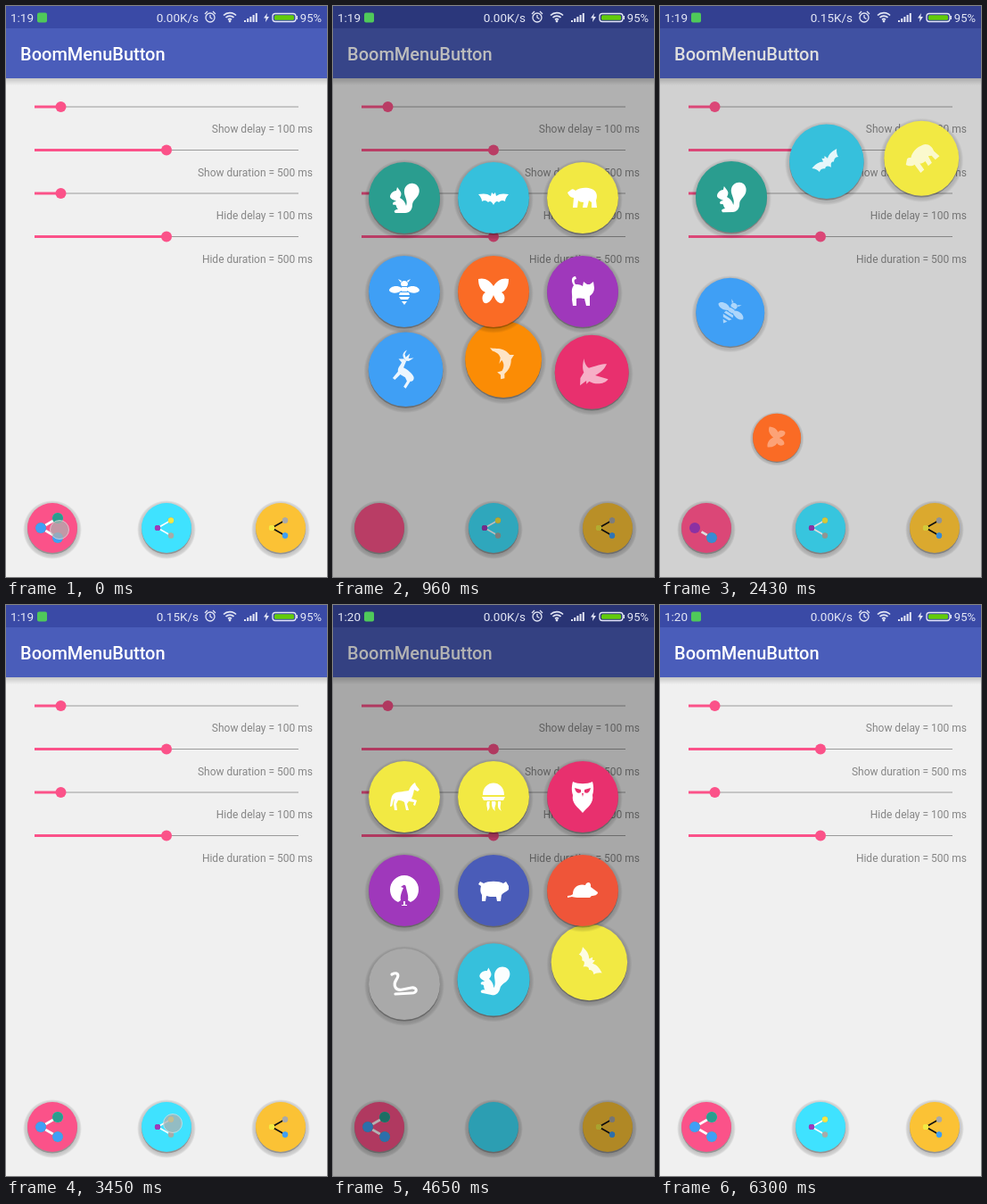
Animation, 360 px wide and 640 px high, one loop 6390 ms. Source, as an HTML page:

```html
<!DOCTYPE html>
<html lang="en">
<head>
<meta charset="utf-8">
<title>BoomMenuButton</title>
<style>
html, body { margin: 0; width: 100%; height: 100%; overflow: hidden; background: #f0f0f0; }
svg { display: block; width: 360px; height: 640px; font-family: Roboto, sans-serif; }
</style>
</head>
<body>
<svg id="stage" viewBox="0 0 360 640" xmlns="http://www.w3.org/2000/svg">
  <defs>
    <radialGradient id="shade">
      <stop offset=".86" stop-color="#000" stop-opacity=".18"/>
      <stop offset=".94" stop-color="#000" stop-opacity=".12"/>
      <stop offset="1" stop-color="#000" stop-opacity="0"/>
    </radialGradient>
    <linearGradient id="drop" x2="0" y2="1">
      <stop stop-color="#000" stop-opacity=".18"/>
      <stop offset="1" stop-color="#000" stop-opacity="0"/>
    </linearGradient>
  </defs>
  <rect width="360" height="640" fill="#f0f0f0"/>
  <rect y="81" width="360" height="8" fill="url(#drop)"/>
  <rect width="360" height="81" fill="#4a5dba"/>
  <rect width="360" height="25" fill="#3a4aa6"/>
  <text x="16" y="61" font-size="20" font-weight="500" fill="#fff">BoomMenuButton</text>
  <g id="sliders"></g>
  <g id="buttons"></g>
  <rect id="dim" width="360" height="640"/>
  <g font-size="13.500" fill="#e4e7f5">
    <text id="clock" x="5" y="18"></text>
    <text id="speed" x="216" y="18" text-anchor="end"></text>
    <text x="354" y="18" text-anchor="end" font-size="13">95%</text>
    <rect x="35" y="7.500" width="11" height="11" rx="2" fill="#4fc95a"/>
    <g fill="none" stroke="#e4e7f5" stroke-width="1.300">
      <circle cx="229" cy="13" r="5"/>
      <path d="M229 10v3l2.500 1.500M223 9l3-3M235 9l-3-3"/>
      <path d="M244 10.500a10 10 0 0 1 14 0M246.500 13a6.500 6.500 0 0 1 9 0M249 15.300a3 3 0 0 1 4 0" stroke-width="1.700"/>
      <rect x="299" y="8.500" width="26" height="9" rx="3"/>
    </g>
    <circle cx="251" cy="17" r="1.400"/>
    <path d="M267 18v-2h2v2zM270.200 18v-4h2v4zM273.400 18v-6h2v6zM276.600 18v-8h2v8zM279.800 18V8h2v10z"/>
    <path d="M293 8l-4 5.500h2.500L291 18l4-6h-2.700z"/>
    <rect x="301" y="10.300" width="22" height="5.400" rx="1.500" fill="#62cc0a"/>
    <rect x="325.500" y="11" width="1.500" height="4"/>
  </g>
  <g id="items"></g>
  <circle id="touch" r="10.500" fill="#b0b0b0" stroke="#ddd" stroke-width="1"/>
</svg>
<script>
const LOOP = 6390, STEP = 30, SPEED = 1.111;
const DELAY = 100, DURATION = 500, TOTAL = 8 * DELAY + DURATION, FADE = 220;
const $ = id => document.getElementById(id);
const clamp = (v, lo = 0, hi = 1) => Math.min(hi, Math.max(lo, v));

function add(parent, tag, attrs) {
  const node = document.createElementNS('http://www.w3.org/2000/svg', tag);
  set(node, attrs);
  return parent.appendChild(node);
}
function set(node, attrs) {
  for (const key in attrs) node.setAttribute(key, attrs[key]);
}

function bezier(x1, y1, x2, y2) {
  const at = (a, b, s) => 3 * (1 - s) ** 2 * s * a + 3 * (1 - s) * s * s * b + s ** 3;
  return t => {
    if (t <= 0 || t >= 1) return clamp(t);
    let lo = 0, hi = 1;
    for (let i = 0; i < 24; i++) {
      const mid = (lo + hi) / 2;
      if (at(x1, x2, mid) < t) lo = mid; else hi = mid;
    }
    return at(y1, y2, lo);
  };
}
const outBack = bezier(.175, .885, .32, 1.275);
const inBack = bezier(.6, -.2, .735, .045);

const icons = {
  squirrel: 'M-16,-1C-16,-5 -12,-8 -9,-8L-8,-12 -5,-8C-3,-6 -3,-3 -5,0C-1,2 1,5 2,9C4,4 1,0 0,-5C-1,-13 5,-17 10,-16C16,-15 18,-9 16,-4C14,1 9,3 9,8C9,13 6,17 1,17L-10,17C-13,15 -10,13 -7,13C-10,10 -8,7 -12,8C-14,7 -13,4 -9,4C-12,2 -15,2 -16,-1Z',
  bat: 'M-17,-4C-11,-5 -7,-5 -3,-2L-2,-6 0,-4 2,-6 3,-2C7,-5 11,-5 17,-4C14,-1 13,2 13,4C10,2 8,3 6,5C4,3 2,4 0,8C-2,4 -4,3 -6,5C-8,3 -10,2 -13,4C-13,2 -14,-1 -17,-4Z',
  bear: 'M-17,-6L-13,-9C-11,-11 -9,-9 -8,-8C-3,-12 5,-12 10,-10C16,-8 17,-2 15,3L16,11 10,11 10,5 7,3 5,11 0,11 1,5C-2,5 -4,4 -5,3L-6,11 -11,11 -10,0C-13,0 -16,-3 -17,-6Z',
  bee: 'M-3,-4C-9,-8 -17,-5 -17,-1C-14,3 -7,2 -3,-1ZM3,-4C9,-8 17,-5 17,-1C14,3 7,2 3,-1ZM-4,-8C-4,-11 -2,-12 0,-12S4,-11 4,-8L3,-6H-3ZM-3,-5H3V0H-3ZM-5,1H5L6,4H-6ZM-6,6H6L4,9H-4ZM-3,11H3L0,15ZM-4,-10L-7,-14 -3,-12ZM4,-10L7,-14 3,-12Z',
  butterfly: 'M0,-6C4,-13 11,-16 17,-14C17,-6 14,-1 9,1C14,4 13,11 10,13C5,14 2,9 0,4C-2,9 -5,14 -10,13C-13,11 -14,4 -9,1C-14,-1 -17,-6 -17,-14C-11,-16 -4,-13 0,-6Z',
  cat: 'M-8,-17C-13,-17 -13,-11 -10,-7C-14,-2 -11,4 -12,9L-11,16 -7,16 -7,8C-4,7 0,8 2,8L4,16 8,16 8,5C11,3 13,0 13,-4L12,-11 8,-8 5,-8 1,-11 0,-6C-3,-8 -6,-8 -8,-8C-10,-11 -10,-14 -7,-14Z',
  deer: 'M-13,-4L-8,-8 -5,-7 -3,0C2,-1 8,-1 12,1C15,4 13,6 12,7L13,16 10,16 9,9 5,7 -1,8 -2,16 -5,16 -5,7C-8,4 -7,0 -8,-3ZM-9,-8C-14,-10 -13,-14 -12,-17L-11,-12 -8,-10 -7,-16 -5,-11 -1,-15 -3,-9 -6,-7Z',
  dolphin: 'M-17,7C-14,4 -13,-2 -7,-6C-5,-7 -3,-8 -1,-8L1,-12 4,-7C10,-4 13,1 14,6L18,8 17,12 13,10 9,12 10,7C8,3 4,1 0,2L2,6 -3,2C-8,1 -11,4 -13,6Z',
  eagle: 'M-15,-8C-12,-4 -8,-2 -5,-2C1,-9 4,-13 9,-16C10,-9 8,-4 5,1L19,-3C19,4 10,10 3,10L2,14 0,11 -3,19 -7,12 -7,5C-11,2 -13,-2 -15,-8Z',
  horse: 'M-11,-4C-7,-6 2,-6 5,-7C7,-12 9,-14 12,-16L13,-13 17,-8 15,-6 11,-8C10,-3 9,0 8,2L14,4 12,10 10,9 11,6 5,5 3,8 5,15 2,15 0,6C-3,4 -5,4 -7,4L-9,8 -8,15 -11,15 -12,8 -11,2C-14,6 -12,11 -16,11C-15,4 -15,-2 -11,-4Z',
  jellyfish: 'M-12,-2C-12,-20 12,-20 12,-2ZM-13,0H13L11,4H-11ZM-7,5h3c-2,4 2,7 -3,11c1,-4 -2,-6 0,-11ZM-2,5h4c2,4 -2,6 0,11c-4,-3 -4,-6 -4,-11ZM5,5h3c1,4 -2,6 1,11c-5,-3 -4,-6 -4,-11Z',
  owl: 'M-11,-17C-5,-14 5,-14 11,-17C13,-10 12,-5 11,-2C13,7 5,12 0,18C-5,12 -13,7 -11,-2C-12,-5 -13,-10 -11,-17ZM-9,-10L-2,-8 -2,-5C-5,-3 -8,-5 -9,-10ZM9,-10L2,-8 2,-5C5,-3 8,-5 9,-10ZM-1,-4H1L0,0Z',
  peacock: 'M-16,-1a16,16 0 1 1 32,0c0,7 -4,12 -9,14L4,11H-4L-7,13C-12,11 -16,6 -16,-1ZM-1,-6L-4,-4 -1,-3C-3,2 -5,6 -4,11L4,11C5,6 3,2 2,-3C2,-6 0,-7 -1,-6ZM-1,12H1V16H3V17H-3V16H-1Z',
  pig: 'M17,-5L14,-10 11,-8C6,-11 -6,-11 -11,-8L-15,-10 -17,-7 -14,-5C-15,-1 -15,2 -13,5L-13,12 -9,12 -8,6 -4,7 3,7 4,12 8,12 9,5C11,2 14,2 17,-1Z',
  mouse: 'M-17,6C-14,6 -12,5 -11,4C-11,-4 -4,-8 3,-6C5,-11 10,-9 9,-4L17,2C17,5 13,6 10,6L8,8H-6C-9,8 -11,7 -12,7L-17,8Z',
  snake: 'M-14,-11C-8,-14 -5,-11 -9,-5C-13,1 -10,8 -2,6L8,4C15,3 15,10 8,10L-10,11'
};
const color = {
  teal: '#2a9d8f', cyan: '#36c0dc', yellow: '#f2e943', blue: '#3f9ff5', orange: '#fa6b25', purple: '#9f38bb',
  amber: '#fb8c05', rose: '#e8306e', indigo: '#4a5cb8', red: '#ef5539', grey: '#a9a9a9'
};

const menus = [
  { x: 52, fill: '#fb5289', line: '#fff', width: 2.6, dot: 6, dx: [6, -13], dy: 11, show: 40, hide: 1708,
    items: 'squirrel teal,bat cyan,bear yellow,bee blue,butterfly orange,cat purple,deer blue,dolphin amber,eagle rose' },
  { x: 180, fill: '#3fe2ff', line: '#fff', width: 1.6, dot: 3.1, dx: [5, -10], dy: 8.5, show: 3588, hide: 5112,
    items: 'horse yellow,jellyfish yellow,owl rose,peacock purple,pig indigo,mouse red,snake grey,squirrel cyan,bat yellow' },
  { x: 308, fill: '#fbc235', line: '#111', width: 1.6, dot: 3.1, dx: [5, -10], dy: 8.5, show: Infinity, hide: Infinity,
    items: ' grey, grey, grey, yellow, yellow, yellow, blue, blue, blue' }
];
const BASE = 585;
const touches = [
  { x: 60, y: 587, on: 0, off: 40 }, { x: 199, y: 419, on: 1560, off: 1708 },
  { x: 187, y: 581, on: 3450, off: 3588 }, { x: 195, y: 425, on: 5040, off: 5112 }
];

// A soft ring with a thin dark crescent below the disc.
function shadedDisc(parent, r, fill) {
  add(parent, 'circle', { cy: 2, r: r + 5, fill: 'url(#shade)' });
  add(parent, 'circle', { cy: 1.6, r, opacity: .25 });
  add(parent, 'circle', { r, fill });
}

['Show delay = 100', 'Show duration = 500', 'Hide delay = 100', 'Hide duration = 500'].forEach((label, i) => {
  const y = 113 + i * 48.5, x = i % 2 ? 180 : 61.5, g = $('sliders');
  add(g, 'path', { d: `M32 ${y}H328`, stroke: '#9a9a9a', 'stroke-width': 1 });
  add(g, 'path', { d: `M32 ${y}H${x}`, stroke: '#fb5289', 'stroke-width': 3 });
  add(g, 'circle', { cx: x, cy: y, r: 6, fill: '#fb5289' });
  add(g, 'text', { x: 344, y: y + 29.3, 'font-size': 12, 'text-anchor': 'end', fill: '#868686' }).textContent = label + ' ms';
});

for (const menu of menus) {
  const g = add($('buttons'), 'g', { transform: `translate(${menu.x} ${BASE})` });
  shadedDisc(g, 28, menu.fill);
  const [right, left] = menu.dx;
  menu.ends = [[right, -menu.dy], [left, 0], [right, menu.dy]];
  menu.lines = [0, 1].map(() => add(g, 'path', { stroke: menu.line, 'stroke-width': menu.width }));
  menu.parts = menu.items.split(',').map((entry, i) => {
    const [name, tone] = entry.split(' ');
    return { name, fill: color[tone], x: 80 + i % 3 * 100, y: 215 + Math.floor(i / 3) * 105 };
  });
  // Earlier parts lie on top of later ones.
  for (let i = 8; i >= 0; i--) {
    const part = menu.parts[i], [cx, cy] = menu.ends[Math.floor(i / 3)];
    part.dot = add(g, 'circle', { cx, cy, r: menu.dot, fill: part.fill });
    if (!part.name) continue;
    part.node = add($('items'), 'g', {});
    shadedDisc(part.node, 40, part.fill);
    const pen = part.name === 'snake'
      ? { fill: 'none', stroke: '#fff', 'stroke-width': 3.2, 'stroke-linecap': 'round' }
      : { fill: '#fff', 'fill-rule': 'evenodd' };
    part.icon = add(part.node, 'path', { d: icons[part.name], ...pen });
  }
}

function drawLine(node, from, to, gone) {
  const x = from[0] + (to[0] - from[0]) * gone, y = from[1] + (to[1] - from[1]) * gone;
  set(node, { d: `M${x} ${y}L${to}`, visibility: gone < 1 ? 'visible' : 'hidden' });
}

// Returns how far the menu is open, in animation ms.
function drawMenu(menu, time) {
  const closing = time >= menu.hide;
  const open = closing
    ? TOTAL - clamp((time - menu.hide) * SPEED, 0, TOTAL)
    : clamp((time - menu.show) * SPEED, 0, TOTAL);
  const [top, left, bottom] = menu.ends;
  drawLine(menu.lines[0], top, left, clamp(open / 300));
  drawLine(menu.lines[1], left, bottom, clamp((open - 300) / 500));
  menu.parts.forEach((part, i) => {
    const t = clamp((open - i * DELAY) / DURATION);
    part.dot.setAttribute('visibility', t > 0 ? 'hidden' : 'visible');
    if (!part.node) return;
    part.node.setAttribute('visibility', t > 0 ? 'visible' : 'hidden');
    if (t <= 0) return;
    const p = closing ? 1 - inBack(1 - t) : outBack(t);
    const x = menu.x + (part.x - menu.x) * p;
    const y = BASE + (part.y - BASE) * p * p;
    const small = menu.dot / 40;
    part.node.setAttribute('transform', `translate(${x} ${y}) scale(${small + (1 - small) * p})`);
    set(part.icon, { transform: `rotate(${(closing ? -720 : 720) * p})`, opacity: t ** .6 });
  });
  return open;
}

function draw(time) {
  const open = Math.max(...menus.map(menu => drawMenu(menu, time)));
  $('dim').setAttribute('opacity', open / TOTAL / 3);
  $('clock').textContent = time < 3800 ? '1:19' : '1:20';
  $('speed').textContent = time >= 1100 && time < 3800 ? '0.15K/s' : '0.00K/s';
  const touch = touches.find(p => time >= p.on && time < p.off + FADE);
  $('touch').setAttribute('visibility', touch ? 'visible' : 'hidden');
  if (touch) set($('touch'), { cx: touch.x, cy: touch.y, opacity: .75 * (1 - clamp((time - touch.off) / FADE)) });
}

const begin = performance.now();
function tick() {
  const time = (performance.now() - begin) % LOOP;
  draw(Math.min(Math.floor(time / STEP) * STEP, 6300));
  requestAnimationFrame(tick);
}
tick();
</script>
</body>
</html>
```
